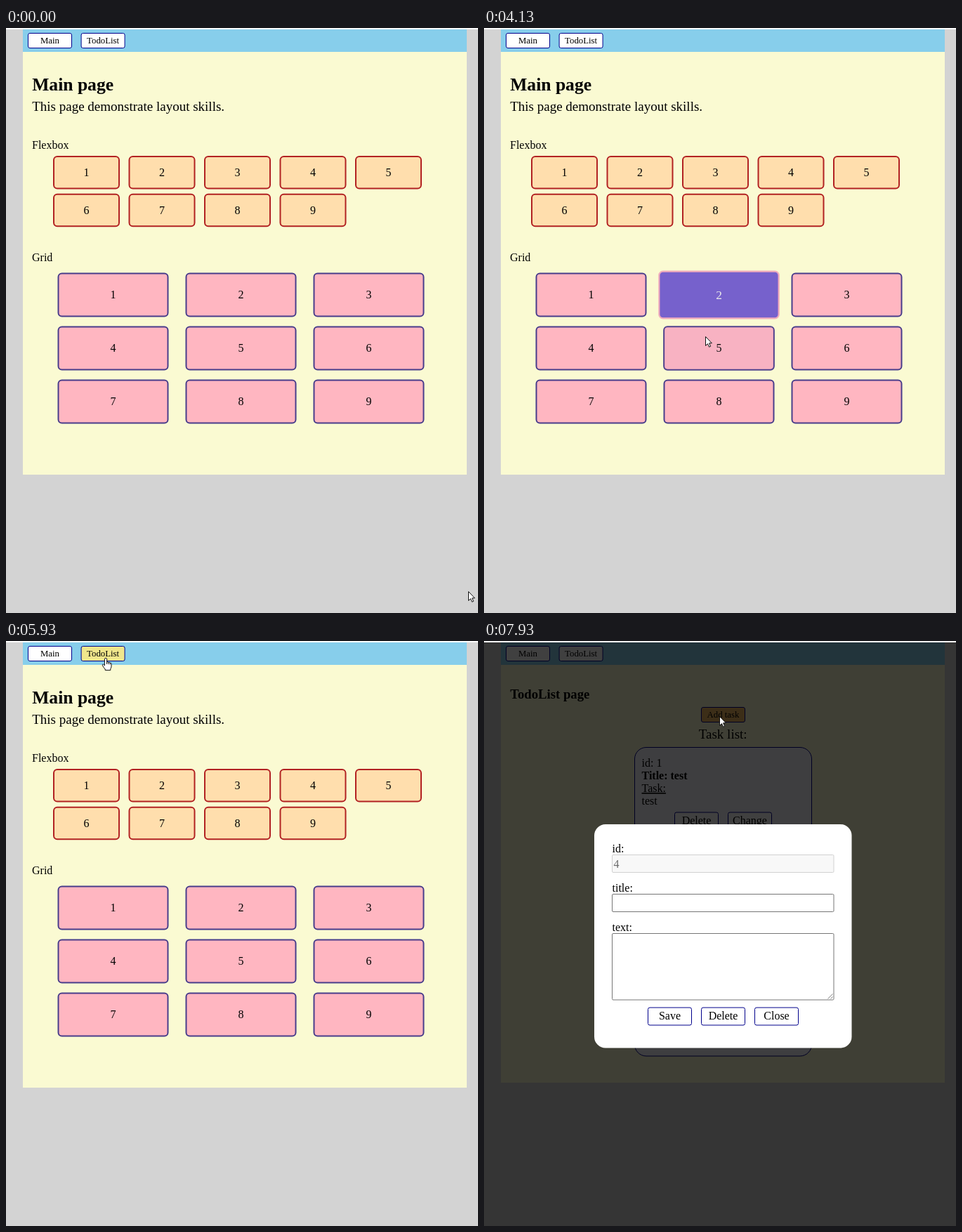
An HTML page that plays this animation: 672 by 833 pixels, repeating every 8000 ms.

```html
<!DOCTYPE html>
<html lang="en">
<head>
<meta charset="utf-8">
<title>Layout demo</title>
<style>
  html, body { margin: 0; width: 100%; height: 100%; overflow: hidden; background: #d3d3d3; }
  svg { display: block; width: 672px; height: 833px; cursor: default; }
  text { font-family: "Liberation Serif", "Times New Roman", serif; white-space: pre; }
</style>
</head>
<body>
<svg id="stage" viewBox="0 0 672 833"></svg>
<script>
const LOOP = 8000;
const NAVY = '#00008b';
const stage = document.getElementById('stage');

// ---- markup helpers ----
const rect = (x, y, w, h, r, fill, stroke = 'none', sw = 0) =>
  `<rect x="${x + sw / 2}" y="${y + sw / 2}" width="${w - sw}" height="${h - sw}" ` +
  `rx="${Math.max(0, r - sw / 2)}" fill="${fill}" stroke="${stroke}" stroke-width="${sw}"/>`;
const text = (x, y, str, size = 16, extra = '') =>
  `<text x="${x}" y="${y}" font-size="${size}" ${extra}>${str}</text>`;
const bold = 'font-weight="bold"';
const middle = 'text-anchor="middle"';
const group = (id, body) => `<g id="${id}">${body}</g>`;
const button = (x, y, label, h = 26, size = 16, id = '') =>
  group(id || 'b' + x + '-' + y,
    rect(x, y, 63, h, 3, '#fff', NAVY, 1) +
    text(x + 31.5, y + h / 2 + size * 0.3, label, size, middle));
const cell = (id, cx, cy, w, h, n, fill, stroke) =>
  `<g transform="translate(${cx} ${cy})">` + group(id,
    rect(-w / 2, -h / 2, w, h, 6, fill, stroke, 2) + text(0, 5.2, n, 16, middle)) + '</g>';

// ---- pages ----
function mainPage() {
  let out = rect(24, 34, 632, 602, 0, '#fafad2') +
    text(37.2, 89, 'Main page', 25.6, bold) +
    text(37.2, 118, 'This page demonstrate layout skills.', 19) +
    text(37, 172, 'Flexbox') + text(37, 332, 'Grid');
  for (let i = 0; i < 9; i++) {
    out += cell('flex' + i, 114.5 + 107.5 * (i % 5), 205.7 + 53.8 * Math.floor(i / 5),
      95, 47.4, i + 1, '#ffdead', '#b22222');
    out += cell('grid' + i, 152.5 + 182 * (i % 3), 380 + 76 * Math.floor(i / 3),
      158, 63, i + 1, '#ffb6c1', '#483d8b');
  }
  return out;
}

function todoPage() {
  const tasks = [['test', 'test'], ['test 200', 'test 200'], ['300', 'sparta']];
  return rect(24, 34, 632, 595, 0, '#fafad2') +
    text(37.2, 82, 'TodoList page', 18.72, bold) +
    button(309, 94, 'Add task', 22, 12.8, 'addBtn') +
    text(340.2, 139, 'Task list:', 19, middle) +
    tasks.map(([title, body], i) => {
      const y = 151 + 151 * i;
      return rect(214, y, 253, 138.5, 17, '#f8f8ff', NAVY, 1) +
        text(224.5, y + 28, 'id: ' + (i + 1)) +
        text(224.5, y + 46, 'Title: ' + title, 16, bold) +
        text(224.5, y + 64, 'Task:', 16, 'text-decoration="underline"') +
        text(224.5, y + 82, body) +
        button(271, y + 92.5, 'Delete') + button(347, y + 92.5, 'Change');
    }).join('');
}

const modal = () =>
  rect(0, 2, 672, 831, 0, 'rgba(0,0,0,.75)') +
  rect(157, 261, 366.5, 318.5, 16, '#fff') +
  text(182.5, 301, 'id:') + text(182.5, 357, 'title:') + text(182.5, 413, 'text:') +
  rect(182, 304, 316.5, 26, 2, '#f8f8f8', '#d1d1d1', 1) +
  text(184.5, 323, '4', 16, 'fill="#6b6b6b"') +
  rect(182, 360, 316.5, 26, 2, '#fff', '#767676', 1) +
  rect(182, 416, 316.5, 95.5, 2, '#fff', '#767676', 1) +
  '<path d="M489.5 509.5l7-7M493.5 509.5l3-3" stroke="#777" stroke-width=".9"/>' +
  button(233, 521.5, 'Save') + button(309, 521.5, 'Delete') + button(385, 521.5, 'Close');

const pointers =
  '<path id="arrow" d="M.5.5V13.4L3.5 10.6 5.5 15.2 7.6 14.3 5.6 9.8H9.4Z" fill="#fff" stroke="#111"/>' +
  '<path id="hand" d="M-1.6 11V1.6Q-1.6.4 0 .4T1.6 1.6V6Q2.8 5.2 4 6.6 5.2 5.8 6.2 7.2' +
  ' 8 6.8 8 8.8V12Q8 14 6.8 15.5V17.6H-.8V16Q-3 14-4.6 10.8-5 9.2-3.6 9.2-2.6 9.4-1.6 11Z' +
  'M1.6 6V9M4 6.8V9.2M6.2 7.4V9.4" fill="#fff" stroke="#111"/>';

stage.innerHTML =
  rect(0, 0, 672, 833, 0, '#d3d3d3') + rect(0, 0, 672, 2, 0, '#fbfbfb') +
  rect(24, 2, 632, 32, 0, '#87ceeb') +
  button(31, 7, 'Main', 22, 12.8) + button(106.6, 7, 'TodoList', 22, 12.8, 'todoBtn') +
  group('main', mainPage()) + group('todo', todoPage()) +
  group('modal', modal()) + group('pointer', pointers);

const $ = id => document.getElementById(id);
const show = (id, on) => $(id).setAttribute('display', on ? 'inline' : 'none');
const fillBox = (id, color) => $(id).firstChild.setAttribute('fill', color);

// ---- motion ----
const mix = (a, b, p) => `rgb(${a.map((v, i) => Math.round(v + (b[i] - v) * p))})`;

// The CSS "ease" curve
function ease(x) {
  if (x <= 0) return 0;
  if (x >= 1) return 1;
  let lo = 0, hi = 1;
  for (let i = 0; i < 24; i++) {
    const s = (lo + hi) / 2;
    if (0.75 * s * (1 - s) + s ** 3 < x) lo = s; else hi = s;
  }
  return 0.3 * lo * (1 - lo) ** 2 + 3 * lo * lo * (1 - lo) + lo ** 3;
}

// Hover transition: forward while inside, shortened reverse after leaving
function hover(t, spans, dur) {
  let level = 0;
  for (const [enter, leave] of spans) {
    if (t < enter) break;
    const top = ease((Math.min(t, leave) - enter) / dur);
    level = t < leave ? top : top * (1 - ease((t - leave) / (dur * top)));
  }
  return level;
}

const flexHover = [[[1260, 2100]], [[2150, 2945]], [[2955, 3350]]];
const gridHover = { 1: [[3475, 4086]], 4: [[4100, 4580], [5190, 5215]], 7: [[4600, 5180]] };

// time, x, y
const path = [
  [0, 658, 802], [69, 658, 802], [130, 621, 751], [210, 621, 751], [700, 128, 28],
  [800, 138, 34], [1010, 138, 34], [1260, 122, 183], [1400, 110, 206], [1730, 107, 207],
  [1950, 114, 209], [2100, 162, 207], [2350, 222, 207], [2780, 232, 210], [2945, 272, 211],
  [3200, 338, 211], [3350, 336, 230], [3475, 330, 349], [3650, 320, 380], [3900, 318, 388],
  [4086, 316, 411], [4130, 315, 439], [4300, 308, 456], [4480, 304, 460], [4600, 302, 500],
  [4750, 300, 530], [5080, 300, 530], [5200, 292, 455], [5330, 113, 150], [5480, 138, 34],
  [5600, 142, 24], [6360, 142, 24], [6460, 160, 48], [6730, 249, 169], [6960, 249, 169],
  [7330, 323, 119], [7480, 323, 119], [7650, 335, 107], [LOOP, 335, 107]
];

function pointerAt(t) {
  const i = path.findIndex(p => p[0] > t);
  const [t0, x0, y0] = path[i - 1], [t1, x1, y1] = path[i];
  const k = (t - t0) / (t1 - t0);
  return [Math.round(x0 + (x1 - x0) * k), Math.round(y0 + (y1 - y0) * k)];
}

function draw(t) {
  const onTodo = t >= 5500 && t < 6400;
  const onAdd = t >= 7560;
  const open = t >= 7800;

  flexHover.forEach((spans, i) => {
    const p = hover(t, spans, 1000);
    $('flex' + i).setAttribute('transform', `scale(${Math.cos(p * 2 * Math.PI).toFixed(4)} 1)`);
    fillBox('flex' + i, mix([255, 222, 173], [255, 255, 255], p));
  });

  for (const i in gridHover) {
    const p = hover(t, gridHover[i], 500);
    const g = $('grid' + i);
    g.setAttribute('transform', `scale(${1 + 0.1 * p})`);
    fillBox('grid' + i, mix([255, 182, 193], [106, 90, 205], p));
    g.firstChild.setAttribute('stroke', mix([72, 61, 139], [255, 182, 193], p));
    g.lastChild.setAttribute('fill', mix([0, 0, 0], [255, 255, 255], p));
  }

  fillBox('todoBtn', onTodo ? '#f0e68c' : '#fff');
  fillBox('addBtn', open ? '#f0b860' : onAdd ? '#f0e68c' : '#fff');
  show('main', t < 6130);
  show('todo', t >= 6130);
  show('modal', open);

  const hand = onTodo || (onAdd && !open);
  show('hand', hand);
  show('arrow', !hand);
  $('pointer').setAttribute('transform', `translate(${pointerAt(t)})`);
}

const start = performance.now();
function tick() {
  draw((performance.now() - start) % LOOP);
  requestAnimationFrame(tick);
}
tick();
</script>
</body>
</html>
```
